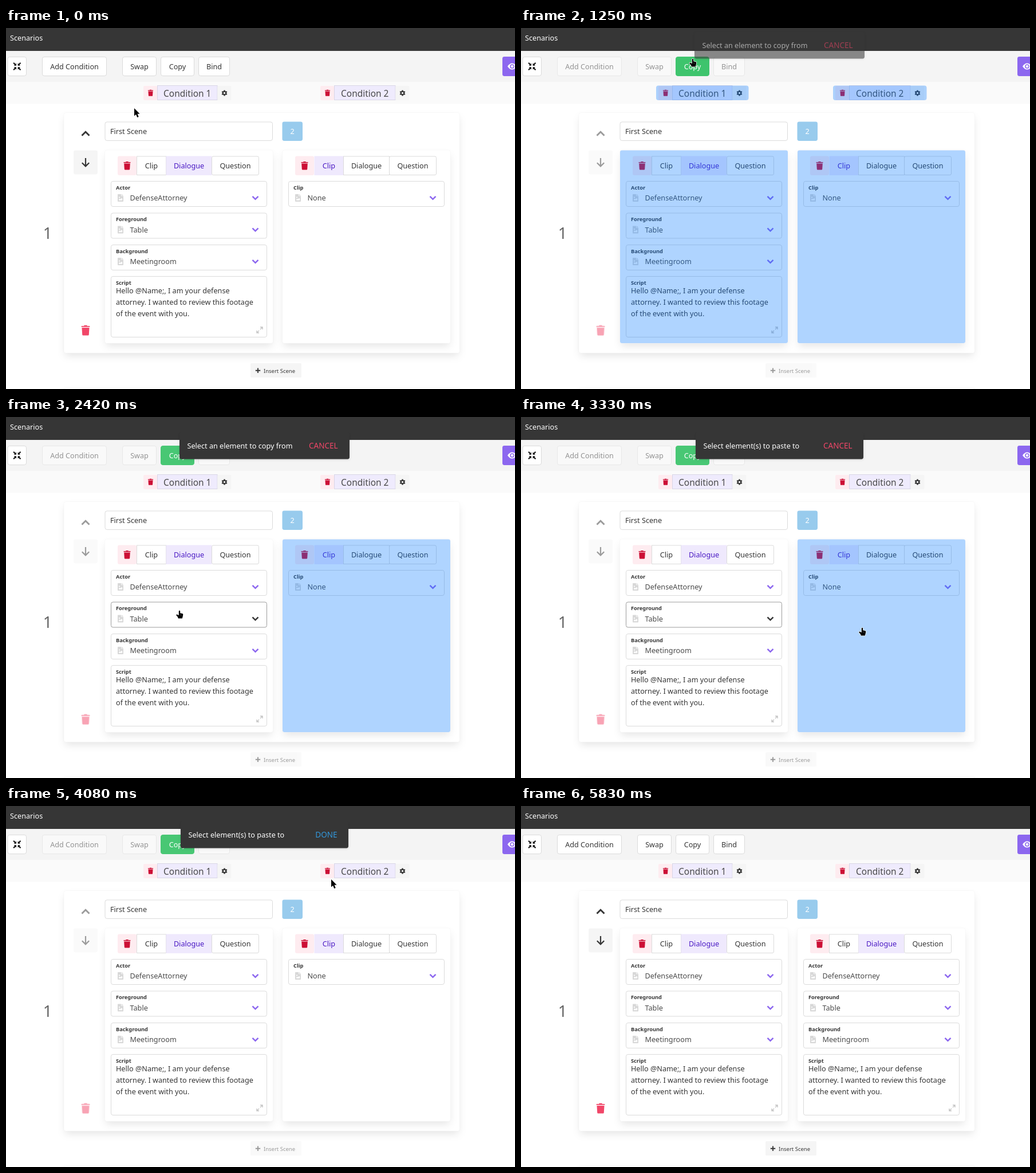
These frames come from a looping animation (889x630 px, 6260 ms). An HTML page:

```html
<!DOCTYPE html>
<html lang="en">
<head>
<meta charset="utf-8">
<title>Scenarios</title>
<style>
  html, body { margin: 0; width: 100%; height: 100%; overflow: hidden; background: #fff; }
  svg { display: block; width: 889px; height: 630px; font-family: "Noto Sans", "Open Sans", sans-serif; }
  text { white-space: pre; }
</style>
</head>
<body>
<svg id="stage" viewBox="0 0 889 630"></svg>
<script>
const LOOP = 6260, RATE = 12 / 1000;
const INK = '#363636', LINE = '#dbdbdb', VIOLET = '#8c67ef', RED = '#cc0f35';
const BLUE = 'rgba(0,118,255,.314)';
const SIZE = 12.65;

// Steps (twelve per second) at which the interface changes
const COPY = 15, PICKED = 29, RETITLED = 30, PASTED = 47, DONE = 54, GONE = 70;

// Pointer path: step, x, y
const PATH = [
  [5, 224, 140], [8, 234, 105], [10, 248, 70], [13, 300, 54], [18, 300, 54],
  [22, 301, 140], [25, 303, 300], [27, 303, 338], [31, 303, 338], [37, 594, 368],
  [40, 596, 368], [46, 599, 368], [47, 590, 340], [49, 568, 128], [50, 562, 56],
  [61, 563, 56], [69, 486, 72]
];

const BUTTONS = [['Add Condition', 63, 113], ['Swap', 203, 60], ['Copy', 270, 59], ['Bind', 336, 55]];
const SCRIPT = ['Hello @Name;, I am your defense', 'attorney. I wanted to review this footage', 'of the event with you.'];

const rect = (x, y, w, h, fill, r = 0, extra = '') =>
  `<rect x="${x}" y="${y}" width="${w}" height="${h}" rx="${r}" fill="${fill}" ${extra}/>`;
const box = (x, y, w, h, fill = '#fff', stroke = LINE) =>
  rect(x + .5, y + .5, w - 1, h - 1, fill, 3.4, `stroke="${stroke}"`);
const text = (s, x, y, size = SIZE, fill = INK, extra = '') =>
  `<text x="${x}" y="${y}" font-size="${size}" fill="${fill}" ${extra}>${s}</text>`;
const mid = (s, x, y, size, fill) => text(s, x, y, size, fill, 'text-anchor="middle"');
const line = (d, color, w, extra = '') =>
  `<path d="${d}" fill="none" stroke="${color}" stroke-width="${w}" ${extra}/>`;
const shape = (d, fill, extra = '') => `<path d="${d}" fill="${fill}" ${extra}/>`;
const at = (x, y, body, scale = 1) => `<g transform="translate(${x} ${y}) scale(${scale})">${body}</g>`;
const dim = (on, body) => `<g opacity="${on ? .5 : 1}">${body}</g>`;

function card(x, y, w, h) {
  return rect(x + 1.7, y + 8.4, w - 3.4, h - 3.4, 'rgba(10,10,10,.1)', 3, 'filter="url(#soft)"') +
    rect(x - .5, y - .5, w + 1, h + 1, '#fff', 4, 'stroke="rgba(10,10,10,.025)"');
}

const trash = (x, y, color, scale = 1) => at(x, y,
  shape('M-6-6.1q0-.5.5-.5H-2.4l.5-.9h3.8l.5.9H5.5q.5 0 .5.5v1.1H-6zM-5.3-4H5.3L4.7 5.8Q4.6 7 3.5 7h-7q-1.1 0-1.2-1.2z', color), scale);

function gear(x, y) {
  let teeth = '';
  for (let a = 0; a < 360; a += 60) teeth += rect(-1.2, -5, 2.4, 3, INK, .4, `transform="rotate(${a})"`);
  return at(x, y, teeth + `<circle r="2.7" fill="none" stroke="${INK}" stroke-width="2.1"/>`);
}

function inwardArrows(x, y) {
  let s = '';
  for (let a = 0; a < 360; a += 90)
    s += `<g transform="rotate(${a})">` + shape('M-1.3-1.3V-5.6L-2.8-4.3-5.4-6.9-6.9-5.4-4.3-2.8-5.6-1.3z', '#111') + '</g>';
  return at(x, y, s);
}

const fileIcon = (x, y) => at(x, y,
  shape('M.8 0H6.2V3.2H10V12.2q0 .8-.8.8H.8Q0 13 0 12.2V.8Q0 0 .8 0zM7 0L10 2.6H7z', '#d8d8d8') +
  shape('M2 10.8V9.2L3.4 7.8 4.8 9 7 6.8 8.2 8v2.8z', '#fff') + '<circle cx="3" cy="5.6" r="1.1" fill="#fff"/>');

const expandIcon = (x, y) => at(x, y,
  line('M-4.5 4.5L-1 1M1-1L4.5-4.5M-5 1V5H-1M1-5H5V-1', '#c4c4c4', 1.4));

function select(y, label, value, hover) {
  return box(183, y, 273, 45, 'none', hover ? '#9c9c9c' : LINE) +
    text(label, 192, y + 14.5, 9.25, INK, 'font-weight="700"') +
    fileIcon(195, y + 23) + text(value, 216.5, y + 34, SIZE, '#4a4a4a') +
    line(`M430.5 ${y + 26.8}l5 5 5-5`, hover ? INK : VIOLET, 2.5);
}

function tabs(active) {
  const list = [['Clip', 228, 52], ['Dialogue', 279, 81], ['Question', 359, 83]];
  const bg = rect(195, 223.5, 33, 33.5, '#feecf0', 3) + trash(211.5, 240.5, RED);
  return bg + list.map(([name, x, w], i) => {
    const on = name === active;
    const frame = on ? '' : rect(x + .5, 224, w - 1, 32.5, 'none', i === 2 ? 2.5 : 0, `stroke="${LINE}"`);
    return frame + (on ? rect(x + .5, 223.5, w - 1, 33.5, '#efe9fd') : '') +
      mid(name, x + w / 2, 245, SIZE, on ? '#4a19c4' : INK);
  }).join('');
}

function dialogue(hover) {
  return tabs('Dialogue') + select(267, 'Actor', 'DefenseAttorney') +
    select(322.5, 'Foreground', 'Table', hover) + select(378, 'Background', 'Meetingroom') +
    box(183, 433, 273, 107, 'none') + text('Script', 192, 447.5, 9.25, INK, 'font-weight="700"') +
    SCRIPT.map((s, i) => text(s, 192, 463 + i * 20.2)).join('') + expandIcon(443, 527);
}

const clip = () => tabs('Clip') + select(267, 'Clip', 'None');

function panel(dx, body, marked, glow) {
  return at(dx, 0, card(173, 213.5, 293, 336.5) + body +
    (marked ? rect(173, 213.5, 293, 336.5, BLUE, 3.4) : '') +
    (glow ? rect(172.5, 213, 294, 338, 'none', 4, 'stroke="#8fc2fc" stroke-width="2"') : ''));
}

function condition(x, w, n, marked) {
  return rect(x, 101, 24, 25, '#feecf0', 2) + trash(x + 12.5, 113.5, RED, .76) +
    rect(x + 24.5, 100.5, w, 25, '#efebfd', 0, 'stroke="#d9d6e6"') +
    mid('Condition ' + n, x + 24.5 + w / 2, 120, 15.45, '#4a4a4a') +
    rect(x + 25 + w, 101, 24, 25, '#f5f5f5', 2) + gear(x + 37 + w, 113.5) +
    (marked ? rect(x - 4, 100.5, w + 57, 25.5, BLUE, 4) : '');
}

function toolbar(k, hover, copying) {
  return BUTTONS.map(([name, x, w]) => {
    if (name === 'Copy' && copying) {
      const green = k < COPY + 2 ? '#3ec46d' : '#48c774';
      return box(x, 50, w, 34, green, green) + mid(name, x + w / 2, 72, SIZE, '#fff');
    }
    return dim(copying, box(x, 50, w, 34, '#fff', hover === name ? '#4a4a4a' : LINE) +
      mid(name, x + w / 2, 72, SIZE, INK));
  }).join('');
}

function toast(k) {
  if (k < COPY || k >= DONE + 1) return '';
  const first = k < RETITLED, x = first ? 303 : 305, w = first ? 297 : 293;
  const [dy, alpha] = k === COPY ? [-20, .57] : k === COPY + 1 ? [-4, .9] : k === DONE ? [-3, .5] : [0, 1];
  const done = k >= PASTED;
  return `<g transform="translate(0 ${dy})" opacity="${alpha}">` +
    rect(x, 29, w, 45, 'rgba(0,0,0,.16)', 3.4, 'filter="url(#thin)"') +
    rect(x, 27, w, 46.5, INK, 3.4) +
    text(first ? 'Select an element to copy from' : 'Select element(s) to paste to', x + 13.5, 55.3, SIZE, '#fff') +
    text(done ? 'DONE' : 'CANCEL', first ? 579.5 : 578.5, 55.3, 13.5, done ? '#3298dc' : '#f14668', 'text-anchor="end"') +
    '</g>';
}

function pointer(x, y, hand) {
  const d = hand
    ? 'M-1.2 1Q-1-.3 0-.3T1.2 1V4.2L5 5Q6.5 5.4 6.3 7L5.6 10.5 4.8 13.5H-2.2L-3-.0 11-5.6 8Q-6 6.7-4.8 6.4L-1.2 8z'.replace('-3-.0 11', '-3 11')
    : 'M0 0V13.6L3.1 10.7 5.2 16 7.7 15 5.5 9.8H9.6z';
  return at(x, y, shape(d, '#000', 'stroke="#fff" stroke-width="1.4" paint-order="stroke" stroke-linejoin="round"') +
    (hand ? line('M1.2 6.4v1.8M3.2 6.6v1.8', '#777', .6) : ''));
}

function locate(k) {
  if (k <= PATH[0][0]) return PATH[0].slice(1);
  for (let i = 1; i < PATH.length; i++) {
    const [k0, x0, y0] = PATH[i - 1], [k1, x1, y1] = PATH[i];
    if (k <= k1) {
      const u = (k - k0) / (k1 - k0);
      return [x0 + (x1 - x0) * u, y0 + (y1 - y0) * u];
    }
  }
  return PATH[PATH.length - 1].slice(1);
}

const DEFS = `<defs>
  <filter id="soft" x="-20%" y="-20%" width="140%" height="140%"><feGaussianBlur stdDeviation="6.7"/></filter>
  <filter id="thin" x="-10%" y="-30%" width="120%" height="160%"><feGaussianBlur stdDeviation="2"/></filter>
</defs>`;

function scene(k) {
  const copying = k >= COPY && k < DONE, choosing = k >= COPY && k < PICKED;
  const [x, y] = locate(k);
  const over = k < COPY && y >= 50 && y <= 84 && BUTTONS.find(([, bx, w]) => x >= bx && x <= bx + w);
  const inPanel = copying && k < PASTED && y > 213;
  const hand = over || inPanel || (k >= COPY && k < COPY + 3) || (k >= 50 && k <= DONE);

  return DEFS + rect(0, 0, 889, 630, '#fff') +
    rect(0, 40, 889, 54, '#f4f4f4') + rect(0, 94, 889, 38.5, '#fafafa') + rect(0, 0, 889, 40, INK) +
    text('Scenarios', 7, 21.5, SIZE, '#fff') +
    box(2.5, 50, 33.5, 34) + inwardArrows(19.3, 67) +
    toolbar(k, over && over[0], copying) +
    rect(867, 50, 40, 34, VIOLET, 3.4) +
    shape('M876 67Q879.5 61.5 884 61.5T892 67Q888.5 72.5 884 72.5T876 67z', '#fff') +
    `<circle cx="884" cy="67" r="3.1" fill="#fff" stroke="${VIOLET}" stroke-width="1.5"/>` +
    condition(240, 104.5, 1, choosing) + condition(549, 106.5, 2, choosing) +
    card(101.5, 148, 690.5, 419) + card(101.5, 628, 690.5, 419) +
    mid('1', 72.5, 368, 27.5, '#666') +
    dim(copying, line('M132.5 187.8l6.5-6.5 6.5 6.5', INK, 2.9) +
      rect(118, 213.5, 42, 42, '#f5f5f5', 3.4) +
      line('M139 227v14M132.8 235.2l6.2 6.2 6.2-6.2', INK, 2.2) +
      trash(139, 528, '#f14668', 1.23)) +
    box(172.5, 163.5, 293.5, 33.5) + text('First Scene', 182, 185) +
    rect(482.5, 163.5, 35.5, 33.5, '#98cbed', 3.4) + mid('2', 500, 185, SIZE, '#fff') +
    panel(0, dialogue(k >= PICKED && k < PASTED), choosing, choosing && inPanel) +
    panel(310, k >= DONE ? dialogue() : clip(), k >= COPY && k < PASTED) +
    dim(copying, rect(427, 585, 89, 25, '#f5f5f5', 2) +
      line('M440 593.5v8.4M435.8 597.7h8.4', INK, 1.9) + text('Insert Scene', 450, 601.5, 9.47)) +
    toast(k) + (k < GONE ? pointer(x, y, hand) : '');
}

const stage = document.getElementById('stage');
let shown = -1;

function tick(now) {
  const k = Math.floor((now % LOOP + 4) * RATE);
  if (k !== shown) stage.innerHTML = scene(shown = k);
  requestAnimationFrame(tick);
}
tick(performance.now());
</script>
</body>
</html>
```
